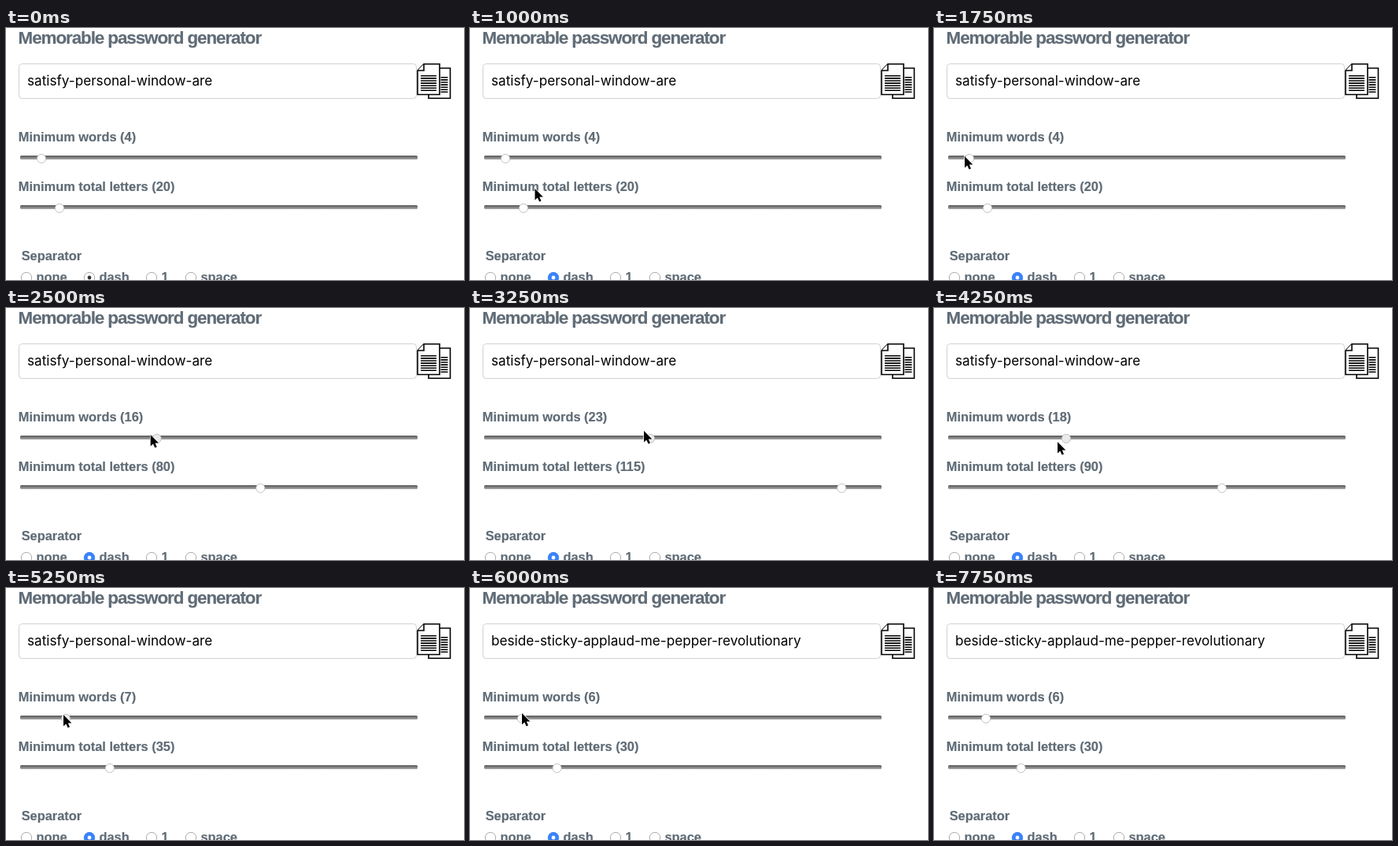
An HTML page that plays this animation: 582 px wide and 320 px high, repeating every 8.5 s.

```html
<!DOCTYPE html>
<html lang="en">
<head>
<meta charset="utf-8">
<title>Memorable password generator</title>
<style>
html, body { margin: 0; width: 100%; height: 100%; overflow: hidden; background: #fff; }
svg { display: block; width: 582px; height: 320px; }
text { font: bold 16.4px "Liberation Sans", Arial, sans-serif; fill: #606c76; stroke: #606c76; stroke-width: .2; }
#title { font-size: 22.4px; letter-spacing: -1.07px; }
#password { font: 17.15px Inter, sans-serif; fill: #000; stroke: none; }
.track { fill: url(#groove); }
.thumb { fill: #fff; stroke: #b4b4b4; stroke-width: .8; }
.radio { fill: #fff; stroke: #a9a9a9; }
.page { fill: #fff; stroke: #000; stroke-width: 1.6; }
.lines { stroke: #000; stroke-dasharray: 1.6 1.5; }
</style>
</head>
<body>
<svg viewBox="0 0 582 320">
  <defs>
    <linearGradient id="groove" x2="0" y2="1">
      <stop stop-color="#555"/>
      <stop offset="1" stop-color="#aaa"/>
    </linearGradient>
  </defs>
  <text id="title" x="15.6" y="20">Memorable password generator</text>

  <rect x="16.5" y="45.5" width="505" height="44" rx="4" fill="#fff" stroke="#d1d1d1"/>
  <text id="password" x="27" y="73"></text>

  <path class="page" d="M537 51H564.5V89.2H537Z"/>
  <path class="lines" d="M557 62V82" stroke-width="9"/>
  <path class="page" d="M531 45.8H551V84.5H523V54Z"/>
  <path class="page" d="M531 45.8V54H523"/>
  <path class="lines" d="M537 60V80" stroke-width="20"/>

  <text id="wordLabel" x="15.8" y="144"></text>
  <rect class="track" x="18" y="162" width="505" height="5" rx="1.5"/>
  <circle class="thumb" id="wordThumb" cy="165.8" r="5.6"/>

  <text id="letterLabel" x="15.8" y="207"></text>
  <rect class="track" x="18" y="225" width="505" height="5" rx="1.5"/>
  <circle class="thumb" id="letterThumb" cy="228.8" r="5.6"/>

  <text x="19.7" y="295">Separator</text>
  <g id="radios"></g>
  <circle id="dot" cx="106" cy="317" r="2.4"/>

  <path id="cursor" d="M0 0V14.4L3.3 11.4L5.6 16.6L8 15.6L5.8 10.4H10.4Z"
        stroke="#fff" stroke-width="1.4" paint-order="stroke"/>
</svg>
<script>
const $ = id => document.getElementById(id);
const STEP = 250, LOOP = 8500, RELEASE = 24, LEAVE = 30;

// Drag key points: step, cursor x, cursor y, word thumb x
const keys = [
  [1, 270, 303, 45], [5, 20, 171, 45], [7, 39, 163, 45],
  [11.5, 256, 160, 265], [13, 221, 156, 229], [14, 128, 164, 136],
  [14.5, 256, 166, 265], [17, 157, 170, 168], [20, 77, 163, 84],
  [21, 73, 161, 76], [23, 66, 159, 66]
];

function poseAt(step) {
  const next = keys.findIndex(k => k[0] > step);
  if (next < 1) return keys.at(next);
  const a = keys[next - 1], b = keys[next];
  const u = (step - a[0]) / (b[0] - a[0]);
  return a.map((v, i) => v + (b[i] - v) * u);
}

const radios = { none: 26, dash: 106, 1: 185, space: 235 };
for (const [name, x] of Object.entries(radios)) {
  $("radios").innerHTML += `<circle class="radio" id="${name}" cx="${x}" cy="317" r="6.7"/>
    <text x="${x + 12.4}" y="322">${name}</text>`;
}

function draw(ms) {
  const step = Math.floor(ms % LOOP / STEP);
  const [, x, y, thumbX] = poseAt(step);
  // The counters trail the thumb by half a step
  const words = Math.round(4 + (poseAt(step - .5)[3] - 45) / 10.3);
  const letters = words * 5;
  const focused = step > 0;
  const dragging = step > 7 && step < RELEASE;

  $("password").textContent = step < RELEASE
    ? "satisfy-personal-window-are"
    : "beside-sticky-applaud-me-pepper-revolutionary";
  $("wordLabel").textContent = `Minimum words (${words})`;
  $("letterLabel").textContent = `Minimum total letters (${letters})`;
  $("wordThumb").setAttribute("cx", thumbX);
  $("wordThumb").style.fill = dragging ? "#ebebeb" : "#fff";
  $("letterThumb").setAttribute("cx", 68 + (letters - 20) * 4.255);
  $("dash").style.fill = focused ? "#3b82f7" : "#fff";
  $("dash").style.stroke = focused ? "#3b82f7" : "#a9a9a9";
  $("dot").style.fill = focused ? "#fff" : "#333";
  $("cursor").setAttribute("transform", `translate(${x} ${y})`);
  $("cursor").style.display = focused && step < LEAVE ? "" : "none";
}

const start = performance.now();
function tick(now) {
  draw(Math.max(0, now - start));
  requestAnimationFrame(tick);
}
draw(0);
requestAnimationFrame(tick);
</script>
</body>
</html>
```
